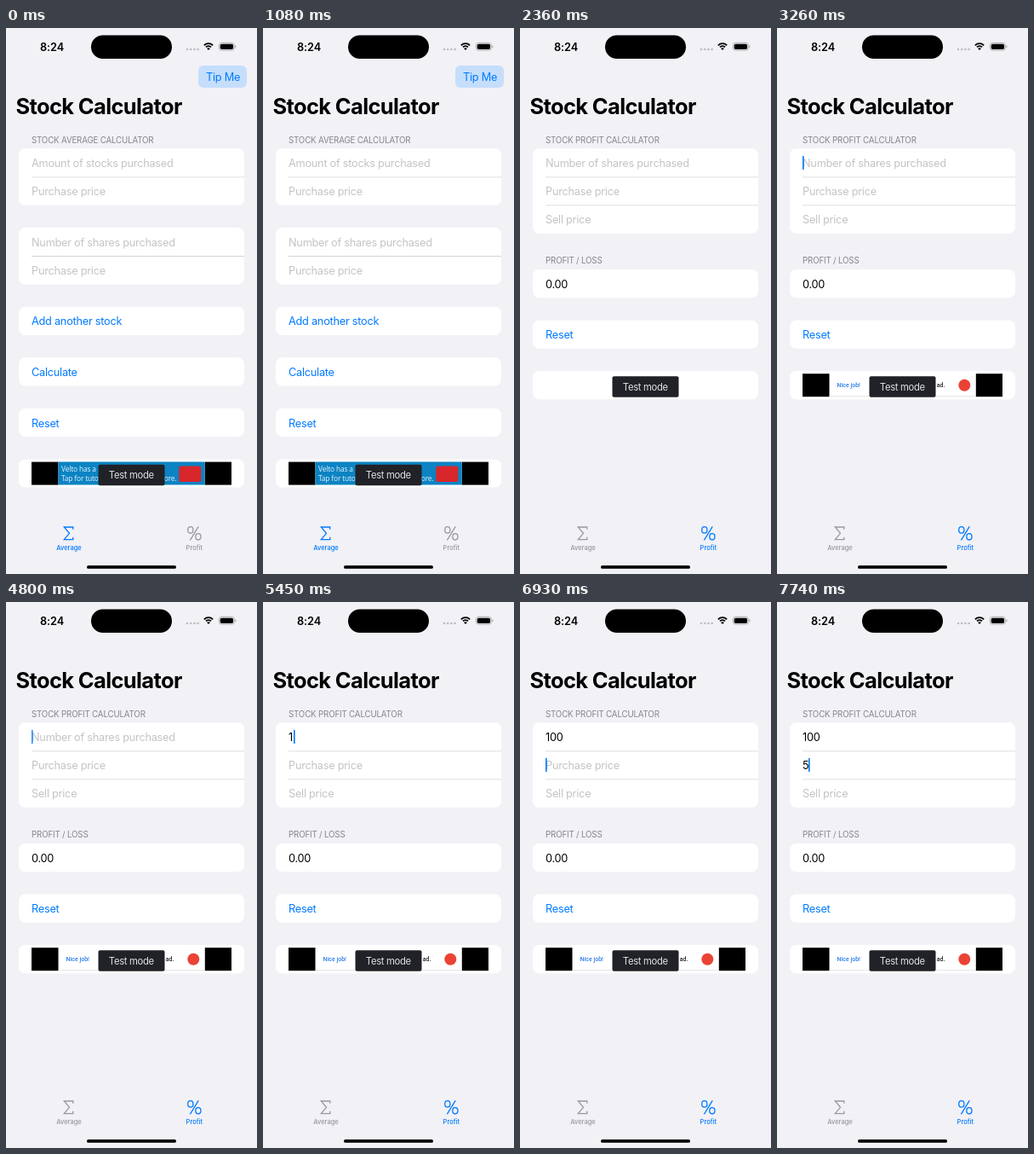
These frames come from a looping animation (295x640 px, 8 s). An HTML page with a canvas:

```html
<!DOCTYPE html>
<html lang="en">
<head>
<meta charset="utf-8">
<title>Stock Calculator</title>
<style>
html, body { margin: 0; width: 100%; height: 100%; overflow: hidden; background: #f2f1f6; }
canvas { display: block; width: 295px; height: 640px; }
</style>
</head>
<body>
<canvas id="stage"></canvas>
<script>
const W = 295, H = 640, LOOP = 8000;
const BLUE = '#007aff', HINT = '#c4c4c7', GRAY = '#85858a', IDLE = '#98989d';
const canvas = document.getElementById('stage');
const ctx = canvas.getContext('2d');
const dpr = window.devicePixelRatio || 1;
canvas.width = W * dpr;
canvas.height = H * dpr;

const SANS = 'Inter, "Liberation Sans", sans-serif';
const ROBOTO = 'Roboto, "Open Sans", sans-serif';
const styles = {
  title: [`700 25.5px ${SANS}`, -0.65],
  body: [`400 12.75px ${SANS}`, -0.26],
  caption: [`400 9.75px ${SANS}`, -0.18],
  clock: [`600 12.75px ${SANS}`, -0.1],
  tab: [`500 7.5px ${SANS}`, 0],
  pill: [`400 11.25px ${SANS}`, -0.3],
  banner: [`400 8.4px "Open Sans", ${ROBOTO}`, -0.15],
  promo: [`500 7px ${ROBOTO}`, 0]
};

// Keyframes hold until the next one.
const FIELD_1 = [[0, ''], [5450, '1'], [5560, '10'], [5710, '100']];
const FIELD_2 = [[0, ''], [7740, '5']];
// [time, x, row, opacity]
const CARET = [
  [0, 30, 0, 0], [3260, 30, 0, 1],
  [3790, 30, 0, .75], [3900, 30, 0, 0], [4140, 30, 0, .5], [4260, 30, 0, 1],
  [4800, 30, 0, .85], [4920, 30, 0, 0], [5160, 30, 0, .5], [5280, 30, 0, 1],
  [5450, 36, 0, 1], [5560, 43, 0, 1], [5710, 50.5, 0, 1], [5920, 30, 1, 1],
  [6450, 30, 1, .85], [6570, 30, 1, 0], [6810, 30, 1, .5], [6930, 30, 1, 1],
  [7470, 30, 1, .7], [7740, 37, 1, 1]
];

const at = (keys, t) => keys.filter(k => k[0] <= t).pop();

function text(str, x, y, style, color, align = 'left') {
  [ctx.font, ctx.letterSpacing] = [styles[style][0], styles[style][1] + 'px'];
  ctx.fillStyle = color;
  ctx.textAlign = align;
  ctx.fillText(str, x, y);
}

function box(x, y, w, h, color, r = 0) {
  ctx.fillStyle = color;
  ctx.beginPath();
  ctx.roundRect(x, y, w, h, r);
  ctx.fill();
}

function disc(x, y, r, color) {
  ctx.fillStyle = color;
  ctx.beginPath();
  ctx.arc(x, y, r, 0, Math.PI * 2);
  ctx.fill();
}

function line(points, color, width) {
  ctx.strokeStyle = color;
  ctx.lineWidth = width;
  ctx.beginPath();
  points.forEach(([x, y]) => ctx.lineTo(x, y));
  ctx.stroke();
}

// White group of 33 px rows; each row is [label, color].
function card(y, rows) {
  box(15, y, 265, 33.2 * rows.length, '#fff', 7.5);
  rows.forEach(([label, color], i) => {
    if (i) box(30, y + 33.1 * i, 250, .8, '#d3d3d6');
    text(label, 30, y + 21.7 + 33 * i, 'body', color);
  });
}

function statusBar() {
  text('8:24', 40, 26.6, 'clock', '#000');
  box(100, 8.5, 95, 27.5, '#000', 13.75);
  for (let i = 0; i < 4; i++) disc(213 + i * 4.2, 25, 1.35, '#bdbdc2');
  ctx.strokeStyle = '#000';
  ctx.lineWidth = 1.8;
  for (const r of [4.3, 7.3]) {
    ctx.beginPath();
    ctx.arc(238, 25.5, r, Math.PI * 1.25, Math.PI * 1.75);
    ctx.stroke();
  }
  ctx.fillStyle = '#000';
  ctx.beginPath();
  ctx.moveTo(238, 26);
  ctx.arc(238, 26, 2.7, Math.PI * 1.25, Math.PI * 1.75);
  ctx.fill();
  ctx.strokeStyle = '#a0a0a5';
  ctx.lineWidth = .8;
  ctx.beginPath();
  ctx.roundRect(250.4, 17.4, 18, 8.8, 2.8);
  ctx.stroke();
  box(251.7, 18.7, 15.4, 6.2, '#000', 1.7);
  box(269.4, 20.3, 1, 3, '#a0a0a5', .5);
}

function tabBar(profit) {
  const left = profit ? IDLE : BLUE, right = profit ? BLUE : IDLE;
  line([[78.8, 587.8], [78.8, 585], [68.3, 585], [74.5, 592.3],
    [68.3, 599.6], [78.8, 599.6], [78.8, 596.8]], left, 1.3);
  line([[226.2, 584.3], [216.4, 600.3]], right, 1.3);
  for (const [x, y] of [[216.8, 588.4], [225.9, 596.3]]) {
    ctx.beginPath();
    ctx.ellipse(x, y, 3.1, 3.7, 0, 0, Math.PI * 2);
    ctx.stroke();
  }
  text('Average', 74, 611.6, 'tab', left, 'center');
  text('Profit', 221.3, 611.6, 'tab', right, 'center');
  box(95, 630, 105, 3.8, '#000', 1.9);
}

function pill(y) {
  box(108.5, y, 78, 24.5, '#202227', 2);
  text('Test mode', 120.8, y + 16.5, 'pill', '#e2e2e4');
}

function bars(y) {
  box(30, y, 31.5, 27, '#000');
  box(233.8, y, 31.2, 27, '#000');
}

function averagePage() {
  box(226, 44, 57, 26, '#c5defb', 6);
  text('Tip Me', 235, 61.7, 'body', BLUE);
  text('STOCK AVERAGE CALCULATOR', 30, 134.5, 'caption', GRAY);
  card(141.3, [['Amount of stocks purchased', HINT], ['Purchase price', HINT]]);
  card(234, [['Number of shares purchased', HINT], ['Purchase price', HINT]]);
  card(326.7, [['Add another stock', BLUE]]);
  card(386.2, [['Calculate', BLUE]]);
  card(445.8, [['Reset', BLUE]]);
  card(505.4, [['', BLUE]]);
  bars(508.6);
  box(61.5, 508.6, 172.3, 27, '#0c83c3');
  text('Velto has a', 65, 520, 'banner', '#e4f3fb');
  text('Tap for tutorials', 65, 531.2, 'banner', '#e4f3fb');
  text('more.', 200.5, 531.2, 'banner', '#e4f3fb', 'right');
  box(203.3, 513.5, 26, 18.5, '#d8262b', 2.5);
  pill(511.7);
}

function profitPage(t) {
  const first = at(FIELD_1, t)[1], second = at(FIELD_2, t)[1];
  const field = (value, hint) => value ? [value, '#000'] : [hint, HINT];
  text('STOCK PROFIT CALCULATOR', 30, 134.5, 'caption', GRAY);
  card(141.3, [
    field(first, 'Number of shares purchased'),
    field(second, 'Purchase price'),
    ['Sell price', HINT]
  ]);
  text('PROFIT / LOSS', 30, 276, 'caption', GRAY);
  card(283, [['0.00', '#000']]);
  card(342.5, [['Reset', BLUE]]);
  card(402, [['', BLUE]]);

  if (t >= 2810) {
    bars(405.2);
    box(61.5, 431.2, 172.3, 1, '#e2e2e4');
    text('Nice job!', 70.5, 421.3, 'promo', '#2b7de9');
    text('ad.', 197.5, 421.3, 'promo', '#222', 'right');
    disc(220.3, 418.8, 7, '#ea4335');
  }
  if (t >= 2360) pill(408.2);

  const [, x, row, alpha] = at(CARET, t);
  ctx.globalAlpha = alpha;
  box(x, 149.8 + 33 * row, 1.6, 16.5, BLUE, .8);
  ctx.globalAlpha = 1;
}

function draw(t) {
  const profit = t >= 1270;
  ctx.setTransform(dpr, 0, 0, dpr, 0, 0);
  box(0, 0, W, H, '#f2f1f6');
  statusBar();
  text('Stock Calculator', 11.5, 100.6, 'title', '#000');
  if (profit) profitPage(t); else averagePage();
  tabBar(profit);
}

const start = performance.now();
function tick() {
  draw((performance.now() - start) % LOOP);
  requestAnimationFrame(tick);
}
tick();
</script>
</body>
</html>
```
